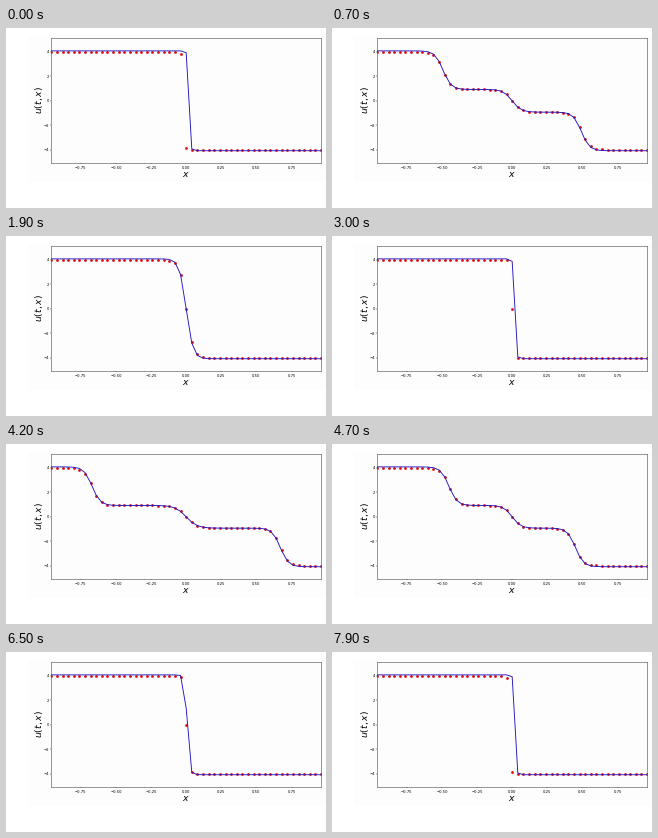
A matplotlib script for the animation above (8000 ms loop, 320x180 px).

```python
import numpy as np
import matplotlib.pyplot as plt
from matplotlib.animation import FuncAnimation
from matplotlib.patches import Rectangle

W, H, DPI = 320, 180, 100
FRAMES, STEP_MS = 80, 100
CYCLE, LEAD = 39, 3          # sweep length in frames, frames before it restarts
SPLIT = 15                   # step of the sweep at which the two fronts merge
PX = 72 / DPI                # points per pixel

x = np.linspace(-0.96, 0.96, 49)


def sigmoid(z):
    return 0.5 * (1 + np.tanh(z / 2))


def smooth(z):
    z = np.clip(z, 0, 1)
    return z * z * (3 - 2 * z)


def two_fronts(s, amp, spread):
    """Two travelling fronts around a smooth inner layer."""
    inner, k = 0.93, 35
    d = 0.67 - 0.0445 * s + spread
    w = 0.077 - 0.0034 * s
    outer = sigmoid(-k * (x + d)) - sigmoid(k * (x - d))
    return -inner * np.tanh(x / w) + (amp - inner) * outer


def shock(s, amp, shift):
    """Single standing front that sharpens as the sweep goes on."""
    r = s - SPLIT
    g = min(20 + 0.625 * r + 0.469 * r * r, 100)
    return -amp * np.tanh(g * (x - shift))


def exact(s):
    if s < SPLIT:
        return two_fronts(s, 4.0, 0)
    return shock(s, 4.0, -0.02 * smooth((s - 28) / 6))


def predicted(s):
    if s < SPLIT:
        return two_fronts(s, 4.09, 0.0028 * max(s - 4, 0))
    return shock(s, 4.09, 0.02 * smooth((s - 20) / 8))


fig = plt.figure(figsize=(W / DPI, H / DPI), dpi=DPI, facecolor="white")
fig.add_artist(Rectangle((22 / W, 26 / H), 298 / W, 146 / H,
                         facecolor="#fdfdfd", edgecolor="none", zorder=-1))

left, right, top, bottom = 45.3, 315.4, 10.3, 135.3
ax = fig.add_axes([left / W, 1 - bottom / H, (right - left) / W, (bottom - top) / H],
                  facecolor="#fdfdfd")
ax.set_xlim(-0.96, 0.9625)
ax.set_ylim(-5.12, 5.12)
ax.set_xticks(np.arange(-0.75, 0.8, 0.25))
ax.set_yticks(range(-4, 5, 2))
ax.xaxis.set_major_formatter("{x:.2f}")
ax.tick_params(labelsize=3.8 * PX, length=1.3 * PX, width=0.4 * PX, pad=1.2 * PX)
for spine in ax.spines.values():
    spine.set_linewidth(0.6 * PX)
    spine.set_color("#555555")

label = dict(fontsize=9.3 * PX, ha="center", va="center")
fig.text(180 / W, 1 - 146.4 / H, "$x$", **label)
fig.text(32.7 / W, 1 - 72.2 / H, "$u(t, x)$", rotation=90, **label)

dots, = ax.plot([], [], "o", color="#e0100c", ms=2.8 * PX, mew=0,
                snap=False, zorder=2)
curve, = ax.plot([], [], color="#1f14c4", lw=0.9 * PX, zorder=3)


def draw(n):
    s = (n - LEAD) % CYCLE
    dots.set_data(x, exact(s))
    curve.set_data(x, predicted(s))
    return dots, curve


anim = FuncAnimation(fig, draw, frames=FRAMES, interval=STEP_MS,
                     init_func=lambda: draw(0), repeat=True, repeat_delay=0)
plt.show()
```
